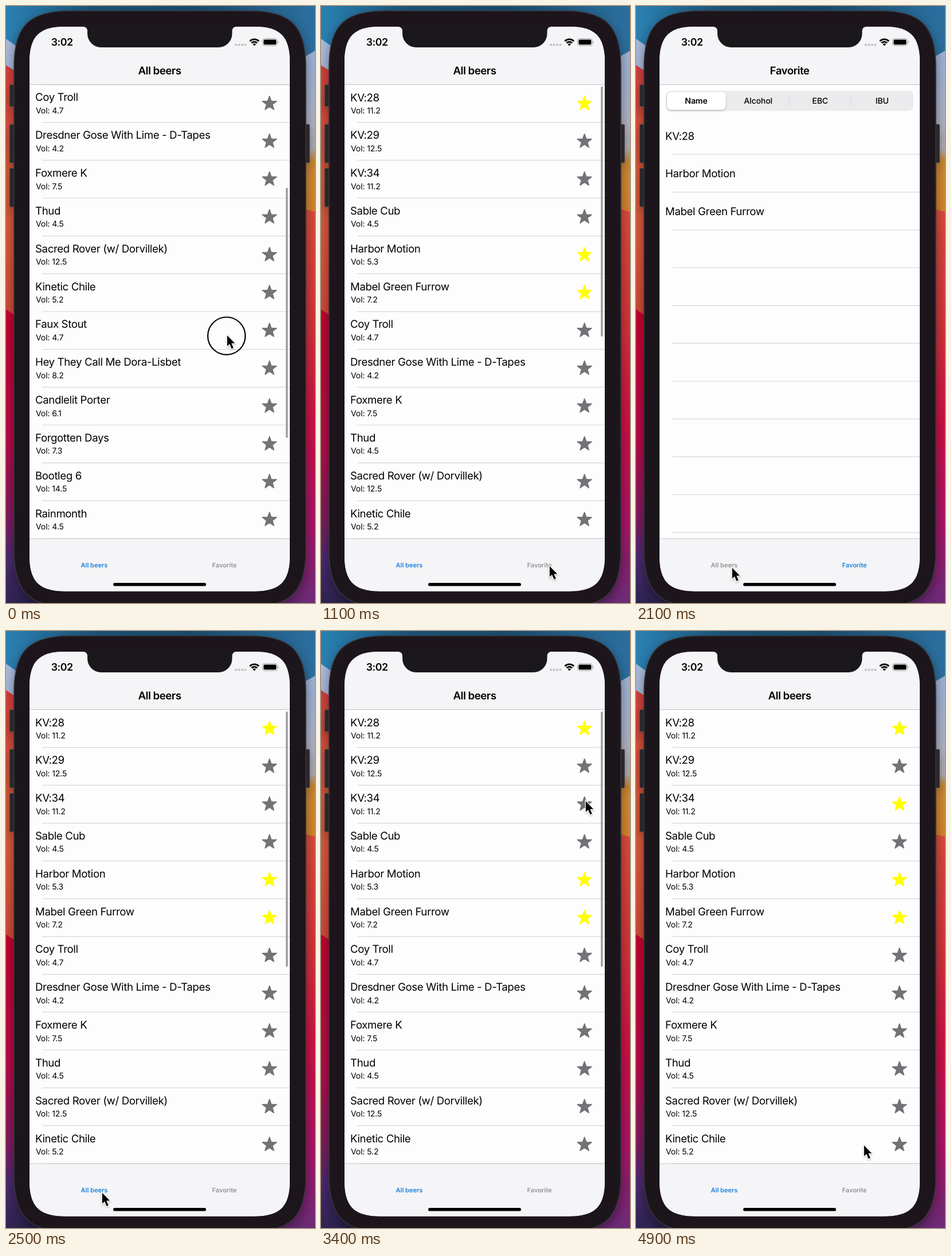
An HTML page for the animation above (5000 ms loop, 539x1039 px).

```html
<!DOCTYPE html>
<html lang="en">
<head>
<meta charset="utf-8">
<title>Beer list</title>
<style>
  html, body { margin: 0; width: 100%; height: 100%; overflow: hidden; }
  svg { display: block; width: 539px; height: 1039px; font-family: Inter, sans-serif; text-rendering: geometricPrecision; }
  .name, .title { font-size: 18.64px; letter-spacing: -.02em; }
  .title, .clock { font-weight: 600; text-anchor: middle; }
  .title { letter-spacing: -.026em; }
  .clock { font-size: 17.8px; letter-spacing: -.025em; }
  .vol { font-size: 14.1px; letter-spacing: -.01em; }
  .seg { font-size: 14.1px; font-weight: 500; letter-spacing: -.01em; text-anchor: middle; }
  .tab { font-size: 11px; font-weight: 600; text-anchor: middle; }
  .line { stroke: #d6d5d9; stroke-width: 1.2; }
  .bar { fill: #f5f4f6; }
  .edge { stroke: #c9c8cb; stroke-width: 1.2; }
</style>
</head>
<body>
<svg viewBox="0 0 539 1039">
  <defs>
    <linearGradient id="sky">
      <stop offset="0" stop-color="#2a80b2"/><stop offset=".3" stop-color="#1b5276"/>
      <stop offset=".6" stop-color="#1a4c6f"/><stop offset="1" stop-color="#2b6f9f"/>
    </linearGradient>
    <linearGradient id="warm" x2="0" y2="1">
      <stop offset=".1" stop-color="#d23f3c"/><stop offset=".3" stop-color="#e0603c"/>
      <stop offset=".51" stop-color="#cf4a3a"/>
    </linearGradient>
    <linearGradient id="crimson" x2="0" y2="1">
      <stop offset="0" stop-color="#c4042f"/><stop offset=".45" stop-color="#b80a4a"/>
      <stop offset=".72" stop-color="#7c1c60"/><stop offset=".85" stop-color="#4b2a70"/>
      <stop offset="1" stop-color="#2c2350"/>
    </linearGradient>
    <linearGradient id="amber" x2="0" y2="1">
      <stop offset=".3" stop-color="#9fb1d3"/><stop offset=".68" stop-color="#b6b3bb"/>
      <stop offset=".74" stop-color="#d08c34"/><stop offset="1" stop-color="#d5822c"/>
    </linearGradient>
    <linearGradient id="rose" x2="0" y2="1">
      <stop offset="0" stop-color="#d94c3b"/><stop offset=".3" stop-color="#d2333a"/>
      <stop offset=".55" stop-color="#cd0f46"/><stop offset=".8" stop-color="#a81468"/>
      <stop offset="1" stop-color="#6b2b78"/>
    </linearGradient>
    <clipPath id="screen"><path id="glass"/></clipPath>
    <clipPath id="list"><rect x="41" y="136" width="454" height="791"/></clipPath>
    <filter id="soft" x="-30%" y="-30%" width="160%" height="160%">
      <feDropShadow dx="0" dy="1.5" stdDeviation="1.5" flood-opacity=".28"/>
    </filter>
    <filter id="cast" x="-20%" y="-10%" width="140%" height="120%">
      <feDropShadow dx="0" dy="9" stdDeviation="10" flood-opacity=".4"/>
    </filter>
  </defs>

  <!-- wallpaper -->
  <rect width="270" height="1039" fill="url(#warm)"/>
  <path d="M0 50L90 50V160L0 103Z" fill="#a8b8d8"/>
  <path d="M0 528L60 568H270V1039H0Z" fill="url(#crimson)"/>
  <rect x="270" width="269" height="365" fill="url(#amber)"/>
  <path d="M539 358L500 348H270V1039H539Z" fill="url(#rose)"/>
  <path d="M0 0H539V78L500 100H60L0 57Z" fill="url(#sky)"/>

  <!-- phone -->
  <g filter="url(#cast)">
    <g fill="#29282a" stroke="#48464a">
      <rect x="6.5" y="137" width="12" height="38" rx="2"/>
      <rect x="6.5" y="206" width="12" height="67" rx="2"/>
      <rect x="6.5" y="282.5" width="12" height="67" rx="2"/>
      <rect x="518" y="206" width="11.5" height="67" rx="2"/>
    </g>
    <path id="body" fill="#1a181b" stroke="#38363a" stroke-width="1.5"/>
  </g>

  <g clip-path="url(#screen)">
    <rect x="41" y="36" width="454" height="983" fill="#fefdfe"/>
    <g clip-path="url(#list)">
      <g id="beers">
        <g id="rows"></g>
        <rect id="thumb" x="488.2" width="3.4" rx="1.7" fill="#9b9a9d"/>
      </g>
      <g id="favorites">
        <rect x="52" y="147.5" width="432" height="35" rx="8.5" fill="#ebeaec"/>
        <rect x="54" y="149.7" width="102.5" height="31" rx="7" fill="#fff" filter="url(#soft)"/>
        <path class="line" d="M267.5 155V175M374.7 155V175"/>
      </g>
    </g>
    <rect class="bar" x="41" y="36" width="454" height="100.5"/>
    <rect class="bar" x="41" y="927" width="454" height="92"/>
    <path class="edge" d="M41 136.7H495M41 927H495"/>
    <text id="title" class="title" x="268" y="119"></text>
    <text id="allTab" class="tab" x="154" y="976.8">All beers</text>
    <text id="favTab" class="tab" x="381" y="976.8">Favorite</text>
    <rect x="187" y="1004" width="162" height="5.6" rx="2.8"/>
  </g>
  <path d="M133 35H403V36C397.5 36 394.5 38.5 394.5 44V48A24 24 0 0 1 370.5 72H166A24 24 0 0 1 142 48V44C142 38.5 139 36 133 36Z" fill="#1a181b"/>

  <!-- status bar -->
  <text class="clock" x="97.7" y="69.3">3:02</text>
  <path d="M401 67.5H418" stroke="#c2c1c4" stroke-width="4.2" stroke-linecap="round" stroke-dasharray="0 5.45"/>
  <g fill="none" stroke="#000" stroke-width="2.7">
    <path d="M425.3 61.2A11 11 0 0 1 441.1 61.2"/>
    <path d="M428.3 64.4A6.8 6.8 0 0 1 438.1 64.4"/>
  </g>
  <path d="M433.2 69.5L430.4 66.6A4 4 0 0 1 436 66.6Z"/>
  <rect x="447.5" y="56.8" width="25.8" height="12.2" rx="3.7" fill="none" stroke="#9c9b9e"/>
  <rect x="449.3" y="58.5" width="22.2" height="8.8" rx="2.3"/>
  <path d="M474.7 60.8Q477.4 62.9 474.7 65Z" fill="#9c9b9e"/>

  <g id="pointer">
    <circle id="press" cx="-.3" cy="2.2" r="32.7" fill="none" stroke="#000" stroke-width="2.2"/>
    <path d="M.8 1.2V20L5 16.2L8.5 24.5L11.8 23.1L8.3 14.9H14.2Z" stroke="#fff" stroke-width="2.4" paint-order="stroke" filter="url(#soft)"/>
  </g>
</svg>

<script>
const LOOP = 5000, ROW = 65.83, TOP = 136.8;
const beers = [
  ["KV:28", 11.2], ["KV:29", 12.5], ["KV:34", 11.2], ["Sable Cub", 4.5],
  ["Harbor Motion", 5.3], ["Mabel Green Furrow", 7.2], ["Coy Troll", 4.7],
  ["Dresdner Gose With Lime - D-Tapes", 4.2], ["Foxmere K", 7.5], ["Thud", 4.5],
  ["Sacred Rover (w/ Dorvillek)", 12.5], ["Kinetic Chile", 5.2], ["Faux Stout", 4.7],
  ["Hey They Call Me Dora-Lisbet", 8.2], ["Candlelit Porter", 6.1],
  ["Forgotten Days", 7.3], ["Bootleg 6", 14.5], ["Rainmonth", 4.5]
];
const starred = [0, 4, 5], TAPPED = 2;

const $ = id => document.getElementById(id);
function add(parent, tag, attrs, text = "") {
  const el = document.createElementNS("http://www.w3.org/2000/svg", tag);
  for (const key in attrs) el.setAttribute(key, attrs[key]);
  el.textContent = text;
  return parent.appendChild(el);
}
const label = (parent, cls, x, y, text) => add(parent, "text", { class: cls, x, y }, text);
const separator = (parent, y) => add(parent, "path", { class: "line", d: `M63 ${y}H495` });

// Rectangle whose corners ease into the sides; r is the matching circular radius.
function smoothRect(x, y, w, h, r) {
  const e = r * 1.3, c = r * .35, R = x + w, B = y + h;
  return `M${x + e} ${y}H${R - e}C${R - c} ${y} ${R} ${y + c} ${R} ${y + e}` +
    `V${B - e}C${R} ${B - c} ${R - c} ${B} ${R - e} ${B}` +
    `H${x + e}C${x + c} ${B} ${x} ${B - c} ${x} ${B - e}` +
    `V${y + e}C${x} ${y + c} ${x + c} ${y} ${x + e} ${y}Z`;
}
$("glass").setAttribute("d", smoothRect(41, 36, 454, 982.5, 48));
$("body").setAttribute("d", smoothRect(14, 8.5, 509, 1037, 75));

function starPath(cx, cy) {
  const points = Array.from({ length: 10 }, (_, i) => {
    const r = i % 2 ? 5.3 : 13, a = i * Math.PI / 5;
    return `${cx + r * Math.sin(a)} ${cy - r * Math.cos(a)}`;
  });
  return `M${points.join("L")}Z`;
}

const stars = beers.map(([name, vol], i) => {
  const y = TOP + i * ROW;
  label($("rows"), "name", 51, y + 28.7, name);
  label($("rows"), "vol", 52, y + 50.2, `Vol: ${vol}`);
  separator($("rows"), y + ROW);
  return add($("rows"), "path", { d: starPath(459.6, y + 33), "stroke-width": 1.6, "stroke-linejoin": "round" });
});

["Name", "Alcohol", "EBC", "IBU"].forEach((text, i) =>
  label($("favorites"), "seg", 105 + i * 108.1, 170.2, text).style.fontWeight = i ? 500 : 600);
starred.forEach((beer, i) => label($("favorites"), "name", 51, 232.5 + i * ROW, beers[beer][0]));
for (let i = 0; i < 11; i++) separator($("favorites"), 258 + i * ROW);

// Keys are [time, ...values]; each stretch eases in and out.
function along(keys, t) {
  const next = keys.findIndex(key => key[0] > t);
  if (next < 0) return keys.at(-1).slice(1);
  const a = keys[next - 1], b = keys[next];
  const p = (t - a[0]) / (b[0] - a[0]), e = p * p * (3 - 2 * p);
  return a.slice(1).map((v, i) => v + (b[i + 1] - v) * e);
}
const pointerKeys = [
  [0, 385, 572], [200, 388.8, 705.6], [1100, 398, 973.5], [1240, 398, 973.5],
  [1800, 167, 976.5], [2600, 167, 976.5], [3300, 461, 295],
  [4100, 461, 295], [4900, 397, 894]
];
const scrollKeys = [[0, 395], [200, 106], [1100, 0]];

function draw(now) {
  let t = Math.floor(now % LOOP / 100) * 100;
  if (t > 200 && t < 1100) t = 200;

  const [x, y] = along(pointerKeys, t), [scroll] = along(scrollKeys, t);
  const onFavorites = t >= 1300 && t < 2200;
  const show = (id, on) => $(id).style.display = on ? "" : "none";

  $("pointer").setAttribute("transform", `translate(${x} ${y})`);
  show("press", t < 1100);
  show("beers", !onFavorites);
  show("favorites", onFavorites);
  show("thumb", t < 1300 || t >= 2200 && t < 3700);

  $("rows").setAttribute("transform", `translate(0 ${-scroll})`);
  $("thumb").setAttribute("y", 140 + scroll * .446);
  $("thumb").setAttribute("height", t < 1300 ? 435.5 : 444.5);
  stars.forEach((star, i) => {
    const on = starred.includes(i) || i === TAPPED && t >= 3600;
    star.style.fill = star.style.stroke = on ? "#ffff00" : "#737276";
  });

  $("title").textContent = onFavorites ? "Favorite" : "All beers";
  $("allTab").style.fill = onFavorites ? "#949396" : "#1c82de";
  $("favTab").style.fill = onFavorites ? "#1c82de" : "#949396";
}
function tick() {
  draw(performance.now());
  requestAnimationFrame(tick);
}
tick();
</script>
</body>
</html>
```
